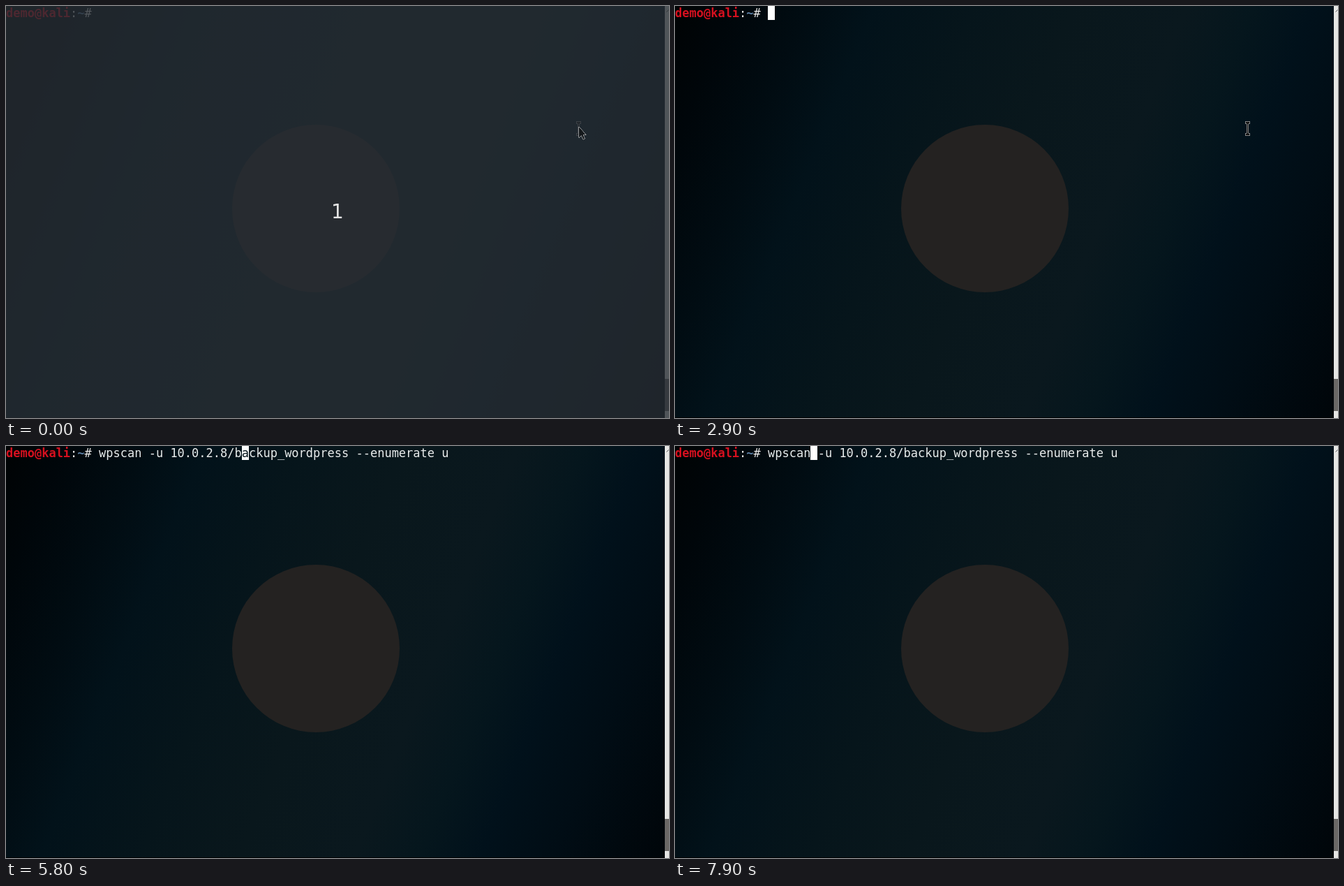
Animation, 950 px wide and 590 px high, one loop 8 s. Source, as an HTML page with a canvas:

```html
<!DOCTYPE html>
<html>
<head>
<meta charset="utf-8">
<style>
html, body { margin: 0; width: 100%; height: 100%; overflow: hidden; background: #000; }
canvas { display: block; }
</style>
</head>
<body>
<canvas id="stage" width="950" height="590"></canvas>
<script>
const ctx = document.getElementById('stage').getContext('2d');
const W = 950, H = 590, LOOP = 8000;
const FONT = '17px "DejaVu Sans Mono", monospace';
const CELL = 17 * 0.602;
const COMMAND = 'wpscan -u 10.0.2.8/backup_wordpress --enumerate u';
const START = 13, END = START + COMMAND.length;

// [time, cursor column]; -1 hides the cursor
const cursorSteps = [
  [0, -1], [100, START], [700, -1], [1300, START], [1900, -1], [2900, START], [3200, -1],
  [3600, START], [3700, END], [4200, -1], [4500, 61], [5100, 58], [5200, 51]
];
for (let i = 1; i <= 9; i++) cursorSteps.push([5300 + i * 100, Math.round(51 - i * 32 / 9)]);
cursorSteps.push([6300, 16], [6400, 13], [6800, 14], [7300, 15], [7400, 16],
  [7600, 17], [7700, 18], [7900, 19]);

const sky = ctx.createLinearGradient(0, 0, 1022, 409);
[[0, '#000304'], [.07, '#00060a'], [.16, '#010c12'], [.24, '#02121a'], [.36, '#06151b'],
 [.48, '#09171c'], [.62, '#0a181e'], [.7, '#05161d'], [.77, '#01111b'], [.86, '#010d15'],
 [1, '#000509']].forEach(([at, color]) => sky.addColorStop(at, color));

function rect(x, y, w, h, color) {
  ctx.fillStyle = color;
  ctx.fillRect(x, y, w, h);
}

function write(text, column, color, bold) {
  ctx.font = (bold ? 'bold ' : '') + FONT;
  ctx.fillStyle = color;
  [...text].forEach((ch, i) => ctx.fillText(ch, (column + i) * CELL, 15.5));
}

function outlined(path, fill, line) {
  const shape = new Path2D(path);
  ctx.strokeStyle = line;
  ctx.lineWidth = 1;
  ctx.stroke(shape);
  ctx.fillStyle = fill;
  ctx.fill(shape);
}

function drawBackdrop() {
  rect(0, 0, W, H, sky);
  ctx.fillStyle = '#242221';
  ctx.beginPath();
  ctx.arc(444, 290, 120, 0, Math.PI * 2);
  ctx.fill();
  rect(0, 589, 944, 1, '#000');
  rect(944, 0, 6, H, '#e6e6e4');
  rect(944, 534, 6, 46, '#6b6866');
  outlined('M946.5 8.5L949.5 5.5', '#555', '#555');
}

function drawLine(t) {
  write('demo@kali', 0, '#d6101f', true);
  write(':', 9, '#e8e8e8');
  write('~', 10, '#5b7ea3', true);
  write('#', 12 - 1, '#e8e8e8');
  const typed = t >= 3700;
  if (typed) write(COMMAND, START, '#e8ebeb');
  const column = cursorSteps.filter(step => step[0] <= t).pop()[1];
  if (column < 0) return;
  rect(Math.round(column * CELL), 0, 10, 20, '#fff');
  if (typed) write(COMMAND[column - START] || ' ', column, '#05141b');
}

function drawBeam() {
  outlined('M817.5 165.5H823.5V168.5H821.5V182.5H823.5V185.5H817.5V182.5H819.5V168.5H817.5Z',
    '#101010', '#f2f2f2');
}

function drawCountdown() {
  rect(0, 0, W, H, 'rgba(40,46,52,.79)');
  ctx.font = '28px "DejaVu Sans", sans-serif';
  ctx.textAlign = 'center';
  ctx.fillStyle = '#e4e4e4';
  ctx.fillText('1', 475, 304);
  ctx.textAlign = 'left';
  outlined('M821 173V188.5L824.5 185.3L827 191L829.3 190L826.8 184.5H831Z', '#15191c', '#fff');
}

function draw(now) {
  const t = now % LOOP;
  drawBackdrop();
  drawLine(t);
  if (t < 3600) drawBeam();
  if (t < 100) drawCountdown();
}

const begin = performance.now();
function tick() {
  draw(performance.now() - begin);
  requestAnimationFrame(tick);
}
tick();
</script>
</body>
</html>
```
